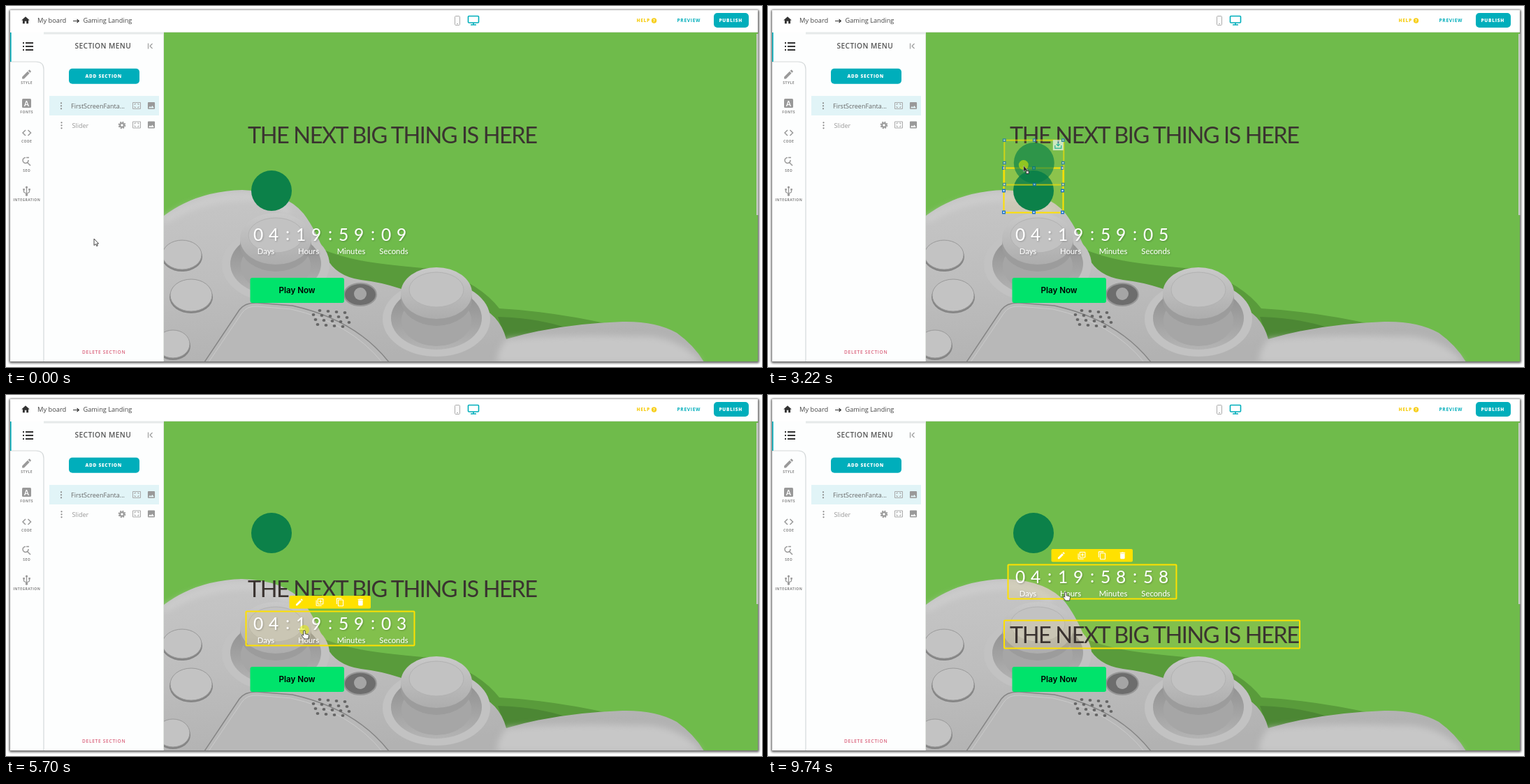
Recreate the animation shown at these times as an HTML page. Size 1082 px wide and 518 px high, loop 9.97 s.

```html
<!DOCTYPE html>
<html lang="en">
<head>
<meta charset="utf-8">
<title>Page builder</title>
<style>
html, body { margin: 0; width: 100%; height: 100%; overflow: hidden; background: #fff; }
svg { display: block; }
text { font-family: "Open Sans", sans-serif; white-space: pre; }
.lato, .lato text { font-family: Lato, sans-serif; }
.caps { font-weight: 800; letter-spacing: .7px; font-size: 6.6px; }
.tiny { font-weight: 700; letter-spacing: .45px; font-size: 5px; fill: #858585; text-anchor: middle; }
.box { fill: rgba(255,225,90,.13); stroke: #ffe100; stroke-width: 2; }
.mid { text-anchor: middle; }
</style>
</head>
<body>
<svg width="1082" height="518" viewBox="0 0 1082 518">
<defs>
  <filter id="blur" x="-5%" y="-5%" width="110%" height="110%"><feGaussianBlur stdDeviation="1.7"/></filter>
  <filter id="soft" x="-20%" y="-20%" width="140%" height="140%"><feGaussianBlur stdDeviation="5"/></filter>
  <filter id="drop" x="-10%" y="-20%" width="120%" height="150%"><feDropShadow dx="1" dy="1" stdDeviation=".8" flood-opacity=".25"/></filter>
  <linearGradient id="body" x1="0" y1="0" x2=".3" y2="1"><stop offset="0" stop-color="#c6c6c6"/><stop offset=".5" stop-color="#bebebe"/><stop offset="1" stop-color="#b2b2b2"/></linearGradient>
  <linearGradient id="cap" x1="0" y1="0" x2="0" y2="1"><stop offset="0" stop-color="#c9c9c9"/><stop offset="1" stop-color="#adadad"/></linearGradient>
  <linearGradient id="well" x1="0" y1="0" x2="0" y2="1"><stop offset="0" stop-color="#8c8c8c"/><stop offset="1" stop-color="#b4b4b4"/></linearGradient>
  <clipPath id="view"><rect x="226" y="38" width="850" height="472"/></clipPath>

  <path id="pencil" d="M3 17.25V21h3.75L17.8 9.9l-3.75-3.75zM20.7 7a1 1 0 0 0 0-1.4l-2.3-2.3a1 1 0 0 0-1.4 0l-1.9 1.8 3.8 3.8z"/>
  <path id="link" d="M3.9 12A3.1 3.1 0 0 1 7 8.9h4V7H7a5 5 0 0 0 0 10h4v-1.9H7A3.1 3.1 0 0 1 3.9 12zM8 13h8v-2H8zM17 7h-4v1.9h4a3.1 3.1 0 0 1 0 6.2h-4V17h4a5 5 0 0 0 0-10z"/>
  <path id="copy" d="M16 1H4a2 2 0 0 0-2 2v14h2V3h12zM19 5H8a2 2 0 0 0-2 2v14a2 2 0 0 0 2 2h11a2 2 0 0 0 2-2V7a2 2 0 0 0-2-2zm0 16H8V7h11z"/>
  <path id="twin" d="M2 7v13a2 2 0 0 0 2 2h13v-2H4V7zM20 2H8a2 2 0 0 0-2 2v12a2 2 0 0 0 2 2h12a2 2 0 0 0 2-2V4a2 2 0 0 0-2-2zm0 14H8V4h12zM13 6v3h-3v2h3v3h2v-3h3V9h-3V6z"/>
  <path id="trash" d="M6 19a2 2 0 0 0 2 2h8a2 2 0 0 0 2-2V7H6zM19 4h-3.5l-1-1h-5l-1 1H5v2h14z"/>
  <path id="home" d="M10 20v-6h4v6h5v-8h3L12 3 2 12h3v8z"/>
  <path id="image" fill-rule="evenodd" d="M21 19V5a2 2 0 0 0-2-2H5a2 2 0 0 0-2 2v14a2 2 0 0 0 2 2h14a2 2 0 0 0 2-2zM8.5 13.5l2.5 3 3.5-4.5 4.5 6H5z"/>

  <circle id="logo" cx="380" cy="265" r="29" fill="#0c8149"/>
  <g id="save">
    <rect x="407" y="232" width="15" height="15" fill="#fff"/>
    <path d="M414.5 234.5v6m-2.500-2.500 2.500 2.500 2.500-2.500M410 240v4h9v-4" fill="none" stroke="#00aebb" stroke-width="1.2"/>
  </g>
  <g id="handles"></g>
  <g id="clock" class="lato" fill="#fff" filter="url(#drop)">
    <g id="digits" font-size="24.5" text-anchor="middle"></g>
    <g id="units" font-size="11.3" text-anchor="middle"></g>
  </g>
</defs>

<rect x="4.500" y="5.500" width="1073.500" height="507" rx="2" fill="#6a6a6a" filter="url(#blur)"/>
<rect x="6" y="6" width="1070" height="504" fill="#fdfefe"/>

<g clip-path="url(#view)">
  <rect x="226" y="38" width="850" height="472" fill="#6fbb4b"/>
  <path d="M450 348Q478 360 512 366T620 378Q680 400 706 434Q780 438 866 457L720 490L480 400Z" fill="#599b3b"/>
  <path d="M704 446Q760 448 800 461L716 480Z" fill="#4c8734"/>
  <path d="M226 301Q272 266 338 264Q400 266 426 298Q444 322 458 360Q472 388 508 393Q536 396 566 406L668 428Q706 440 716 478Q790 456 882 453Q930 452 960 469Q985 487 999 511H226Z" fill="url(#body)"/>
  <path d="M716 478Q700 500 704 512H996Q960 470 900 474Q800 470 716 478Z" fill="#c7c7c7" filter="url(#soft)"/>
  <path d="M226 308Q280 274 345 274Q385 277 405 296" fill="none" stroke="#d0d0d0" stroke-width="7" filter="url(#soft)"/>
  <path d="M284 511L334 436Q342 425 360 426L410 430Q500 450 548 511" fill="#b8b8b8" stroke="#858585" stroke-width="1.5"/>
  <path d="M290 511L338 440Q345 430 360 431L408 435Q492 454 538 511" fill="none" stroke="#cacaca"/>
  <g id="pad"></g>
</g>
<rect x="1074" y="40" width="2.5" height="260" fill="#c8cdc6"/>

<g id="title">
  <rect id="titleBox" class="box" x="338" y="164" width="423" height="40" rx="1"/>
  <text class="lato" x="346" y="196.500" font-size="32.5" letter-spacing="-1.45" fill="#3a3330">THE NEXT BIG THING IS HERE</text>
</g>
<g id="count">
  <rect id="countBox" class="box" x="343.5" y="310.5" width="241" height="49" rx="1"/>
  <use href="#clock"/>
</g>
<rect x="349.5" y="390" width="134.5" height="36" rx="3" fill="#00e36b"/>
<text class="mid" x="416.5" y="411.700" font-size="11.6" font-weight="600" style="font-family:Inter,sans-serif">Play Now</text>
<g id="mark">
  <rect id="markBox" class="box" x="337.5" y="232.5" width="85" height="64"/>
  <use href="#logo"/>
  <use id="markSave" href="#save"/>
  <use id="markHandles" href="#handles"/>
</g>
<g id="markGhost" opacity=".65">
  <rect class="box" x="337.5" y="232.5" width="85" height="64"/>
  <use href="#logo"/><use href="#save"/><use href="#handles"/>
</g>
<g id="countGhost" opacity=".6">
  <rect class="box" x="343.5" y="310.5" width="241" height="49"/>
  <use href="#clock"/>
</g>
<g id="markBar"></g>
<g id="countBar"></g>

<g id="chrome"></g>

<g id="cursor">
  <circle id="press" cx="0" cy="-1" r="7" fill="#e4ee00" opacity=".55"/>
  <path id="arrow" d="M0 0V9.500L2.300 7.500 3.800 10.600 5.200 10 3.900 7H6.600Z" fill="#fff" stroke="#333" stroke-width=".9"/>
  <g id="grab"><path d="M0 0V8.500L2.200 6.800H6Z" fill="#222" stroke="#ddd" stroke-width=".5"/><path d="M3.500 7.500h4v4h-4z" fill="#ddd" stroke="#333"/></g>
  <path id="hand" d="M-1.300 1C-1.300-.6 1.200-.6 1.200 1V4.800L5.400 5.700C6.300 6 6.600 6.700 6.500 7.600L5.600 12H-.2L-3.500 7.500C-4 6.400-2.900 5.700-2 6.500L-1.300 7.200Z" fill="#fff" stroke="#333" stroke-width=".9"/>
</g>
</svg>

<script>
const LOOP = 9970;
const TEAL = '#00aebb';
const $ = id => document.getElementById(id);
const icon = (name, x, y, size, fill) =>
  `<use href="#${name}" fill="${fill}" transform="translate(${x - size / 2} ${y - size / 2}) scale(${size / 24})"/>`;
const rect = (x, y, w, h, fill, rx = 0) =>
  `<rect x="${x}" y="${y}" width="${w}" height="${h}" rx="${rx}" fill="${fill}"/>`;
const line = (d, stroke, width = 1) =>
  `<path d="${d}" fill="none" stroke="${stroke}" stroke-width="${width}"/>`;
const text = (x, y, str, attrs = '') => `<text x="${x}" y="${y}" ${attrs}>${str}</text>`;
const oval = (x, y, rx, ry, fill, more = '') =>
  `<ellipse cx="${x}" cy="${y}" rx="${rx}" ry="${ry}" fill="${fill}" ${more}/>`;

// Game pad details
const stick = (x, y) =>
  oval(x, y + 37, 77, 54, '#c2c2c2') +
  oval(x, y + 36, 65, 45, 'url(#well)') +
  oval(x, y + 39, 50, 37, '#a6a6a6') +
  oval(x, y + 9, 51, 38, '#9c9c9c') +
  oval(x, y, 51, 37, 'url(#cap)') +
  oval(x, y - 5, 39, 25, '#c2c2c2', 'stroke="#b2b2b2"');
const knob = (x, y, rx, ry) =>
  oval(x, y + 3, rx + 1, ry, '#858585') +
  oval(x, y, rx, ry, '#c3c3c3', 'stroke="#999"');
let holes = '';
for (let r = 0; r < 4; r++)
  for (let c = 0; c < 5; c++)
    if (r + c > 0 && r + c < 7) holes += oval(437 + c * 12 + r * 3, 436 + r * 7 + c, 2.4, 1.9, '#666');
$('pad').innerHTML =
  knob(252, 357, 28, 21) + knob(265, 415, 30, 23) + knob(239, 485, 24, 20) +
  stick(386, 334) + stick(616, 412) + holes +
  oval(507, 414, 23, 16, '#6d6d6d', 'stroke="#969696" stroke-width="2"') +
  '<circle cx="507" cy="413" r="9" fill="#a5a5a5"/>';

// Selection handles, toolbars, clock labels
let handles = '';
for (const x of [337.5, 380.5, 421.5])
  for (const y of [232.5, 265, 296])
    if (x !== 380.5 || y !== 265)
      handles += `<rect x="${x - 1.75}" y="${y - 1.75}" width="3.5" height="3.5" fill="#d8ecff" stroke="#0b69c7" stroke-width="1.3"/>`;
$('handles').innerHTML = handles;

const bar = (x, y, w, names) => rect(x, y, w, 18.5, '#ffe100', 2) +
  names.map((n, i) => icon(n, x + 14.3 + i * 29.2, y + 9.3, 13, '#fff')).join('');
$('markBar').innerHTML = bar(307, 209, 145.5, ['pencil', 'link', 'twin', 'copy', 'trash']);
$('countBar').innerHTML = bar(405.5, 288, 116.5, ['pencil', 'twin', 'copy', 'trash']);

const groups = [0, 1, 2, 3].map(i => 361 + i * 61);
$('digits').innerHTML = groups.map((x, i) =>
  text(x, 336.7, '') + text(x + 22, 336.7, '') + (i < 3 ? text(x + 42, 335.5, ':') : '')).join('');
const digitNodes = [...$('digits').children].filter(n => !n.textContent);
$('units').innerHTML = ['Days', 'Hours', 'Minutes', 'Seconds']
  .map((s, i) => text(groups[i] + 11, 355.7, s)).join('');

// Header and side panels
const dots = (x, y) => [-4, 0, 4].map(d => oval(x, y + d, 1.1, 1.1, '#888')).join('');
const fit = (x, y) => line(`M${x - 5.5} ${y - 4.5}h11v9h-11z`, '#aaa') +
  line(`M${x - 3} ${y - 1}v-1.5h2M${x + 1} ${y - 2.5}h2v1.5M${x + 3} ${y + 1}v1.5h-2M${x - 1} ${y + 2.5}h-2v-1.5`, '#aaa');
const listRows = [52, 57, 62].map(y => rect(24, y, 2, 2, '#333') + rect(28, y, 11, 2, '#333')).join('');
$('chrome').innerHTML =
  rect(6, 6, 1070, 32, '#fff') + rect(54, 37.5, 172, 3, '#e6eaea') + rect(226, 37, 850, 1, '#dfe5dc') +
  rect(225, 38, 1, 472, '#e2e6e2') +
  icon('home', 28, 20.5, 14, '#333') +
  text(45, 24, 'My board', 'font-size="9.3" fill="#444"') +
  line('M96 21.5h8M101.5 19l2.8 2.5-2.8 2.5', '#333', 1.2) +
  text(110.5, 24, 'Gaming Landing', 'font-size="9.2" fill="#444"') +
  `<rect x="642.5" y="14.5" width="7" height="13" rx="1.2" fill="#fff" stroke="#aaa"/>` + rect(645, 25, 2, 1, '#aaa') +
  `<rect x="661.5" y="14.5" width="15" height="9.5" rx="1" fill="#fff" stroke="${TEAL}" stroke-width="1.6"/>` +
  line('M669 24v3M665 27h8', TEAL, 1.6) +
  text(902.5, 23.3, 'HELP', 'class="caps" fill="#f7cf1d"') + oval(927.5, 21, 3.7, 3.7, '#f7cf1d') +
  text(927.5, 23.3, '?', 'class="mid" font-size="6" font-weight="700" fill="#fff"') +
  text(960.5, 23, 'PREVIEW', `class="caps" fill="${TEAL}" style="font-weight:700"`) +
  rect(1013, 10, 50, 21, TEAL, 5) + text(1020.5, 23, 'PUBLISH', 'class="caps" fill="#fff"') +
  line('M6 80H43Q54 80 54 91V510', '#d5d9da', 1.2) + rect(6, 38, 1.6, 42, TEAL) + listRows +
  icon('pencil', 29.5, 98, 17, '#999') + text(29.7, 112, 'STYLE', 'class="tiny"') +
  rect(23, 133, 13, 13, '#999', 1.5) +
  text(29.5, 143.5, 'A', 'class="mid" font-size="11" font-weight="600" fill="#fff"') +
  text(29.7, 154, 'FONTS', 'class="tiny"') +
  line('M28 178l-4 4 4 4M31.5 178l4 4-4 4', '#999', 1.5) + text(29.7, 196, 'CODE', 'class="tiny"') +
  line('M32 221a4 4 0 1 1-4-3.5M30.5 224.5l4.5 4.5M29 217.5h4', '#999', 1.5) + text(29.7, 238, 'SEO', 'class="tiny"') +
  line('M29.5 260v11M25.5 263v4l4 2.5 4-2.5v-4', '#999', 1.3) +
  oval(29.5, 260, 1.6, 1.6, '#999') + oval(29.5, 271, 1.8, 1.8, '#999') + rect(24.3, 262, 2.5, 2.5, '#999') + rect(32.3, 262, 2.5, 2.5, '#999') +
  text(29.7, 279.5, 'INTEGRATION', 'class="tiny"') +
  text(98.5, 60.7, 'SECTION MENU', 'font-size="10.2" font-weight="600" letter-spacing=".4" fill="#555"') +
  line('M203.5 53.5v8M209.5 54l-3.5 3.5 3.5 3.5', '#999', 1.1) +
  rect(90, 89.7, 101, 22, TEAL, 5) + text(113.5, 103, 'ADD SECTION', 'class="caps" fill="#fff"') +
  rect(62, 129, 157, 28, '#e1f4f7') +
  dots(79, 143.3) + text(93, 146.8, 'FirstScreenFanta...', 'font-size="9" fill="#666"') +
  fit(187, 143) + icon('image', 208, 143, 13.5, '#999') +
  dots(79.5, 171.3) + text(94.5, 174.5, 'Slider', 'font-size="9" fill="#999"') +
  `<circle cx="166" cy="171" r="4.4" fill="none" stroke="#999" stroke-width="1.8" stroke-dasharray="2 1.45"/>
   <circle cx="166" cy="171" r="2.8" fill="none" stroke="#999" stroke-width="2"/>` +
  fit(187, 170.5) + icon('image', 208, 170.5, 13.5, '#999') +
  text(109, 499.3, 'DELETE SECTION', 'class="caps" fill="#d9607a" style="font-weight:600"');

// Timeline
const TICKS = [250, 1200, 2200, 3200, 3980, 4850, 6000, 6800, 7720, 8750, 9740];
const PATH = [
  [0, 126, 334], [1200, 126, 334], [1810, 365, 269], [2890, 365, 269], [3670, 367, 166],
  [4390, 367, 166], [4680, 434.5, 325], [4910, 427, 338], [5930, 427, 338], [6480, 426, 283], [LOOP, 426, 283]
];
const SWAP_LOGO = 3380, SWAP_CLOCK = 6250;
const ramp = (t, a, b) => Math.min(1, Math.max(0, (t - a) / (b - a)));
const within = (t, a, b) => t >= a && t < b;
const two = n => String(n).padStart(2, '0');
const show = (id, on) => $(id).style.display = on ? '' : 'none';
const move = (id, x, y) => $(id).setAttribute('transform', `translate(${x} ${y})`);
const fade = (id, v) => $(id).setAttribute('opacity', v);

function pointer(t) {
  let i = 0;
  while (i < PATH.length - 2 && t >= PATH[i + 1][0]) i++;
  const [a, b] = [PATH[i], PATH[i + 1]];
  const k = ramp(t, a[0], b[0]), e = k * k * (3 - 2 * k);
  return [a[1] + (b[1] - a[1]) * e, a[2] + (b[2] - a[2]) * e];
}

function render(t) {
  const left = 59 * 60 + 9 - TICKS.filter(x => t >= x).length;
  const digits = '0419' + two(Math.floor(left / 60)) + two(left % 60);
  digitNodes.forEach((n, i) => { if (n.textContent !== digits[i]) n.textContent = digits[i]; });

  const [x, y] = pointer(t);
  const logoUp = t < SWAP_LOGO ? 0 : -67;
  const clockUp = t < SWAP_CLOCK ? 0 : -67;
  move('mark', 0, logoUp);
  move('markBar', 0, logoUp);
  move('count', 0, clockUp);
  move('countBar', 0, clockUp);
  move('title', 0, t < SWAP_LOGO ? 0 : t < SWAP_CLOCK ? 93 : 159.5);
  move('markGhost', x - 365, y - 269);
  move('countGhost', x - 427, y - 338);
  move('cursor', x, y);

  fade('markBox', t < 5700 ? ramp(t, 1700, 1810) : 0);
  show('markSave', within(t, 1780, 2890));
  show('markHandles', within(t, 2590, 5700));
  fade('titleBox', t < SWAP_LOGO ? 0 : t < SWAP_CLOCK ? 1 - ramp(t, 4560, 4740) : 1);
  fade('countBox', ramp(t, 4560, 4730));

  const dragLogo = within(t, 2890, 3840), dragClock = within(t, 5930, 6710);
  show('markGhost', dragLogo);
  show('countGhost', dragClock);
  show('markBar', within(t, 2590, 2890) || within(t, 3840, 5700));
  show('countBar', within(t, 5700, 5930) || t >= 6710);

  const grabbing = dragLogo || dragClock;
  show('press', within(t, 2590, 3900) || within(t, 5700, 6770));
  show('arrow', t < 1740);
  show('grab', grabbing);
  show('hand', t >= 1740 && !grabbing);
}

const start = performance.now();
function frame() {
  render((performance.now() - start) % LOOP);
  requestAnimationFrame(frame);
}
render(0);
frame();
</script>
</body>
</html>
```
